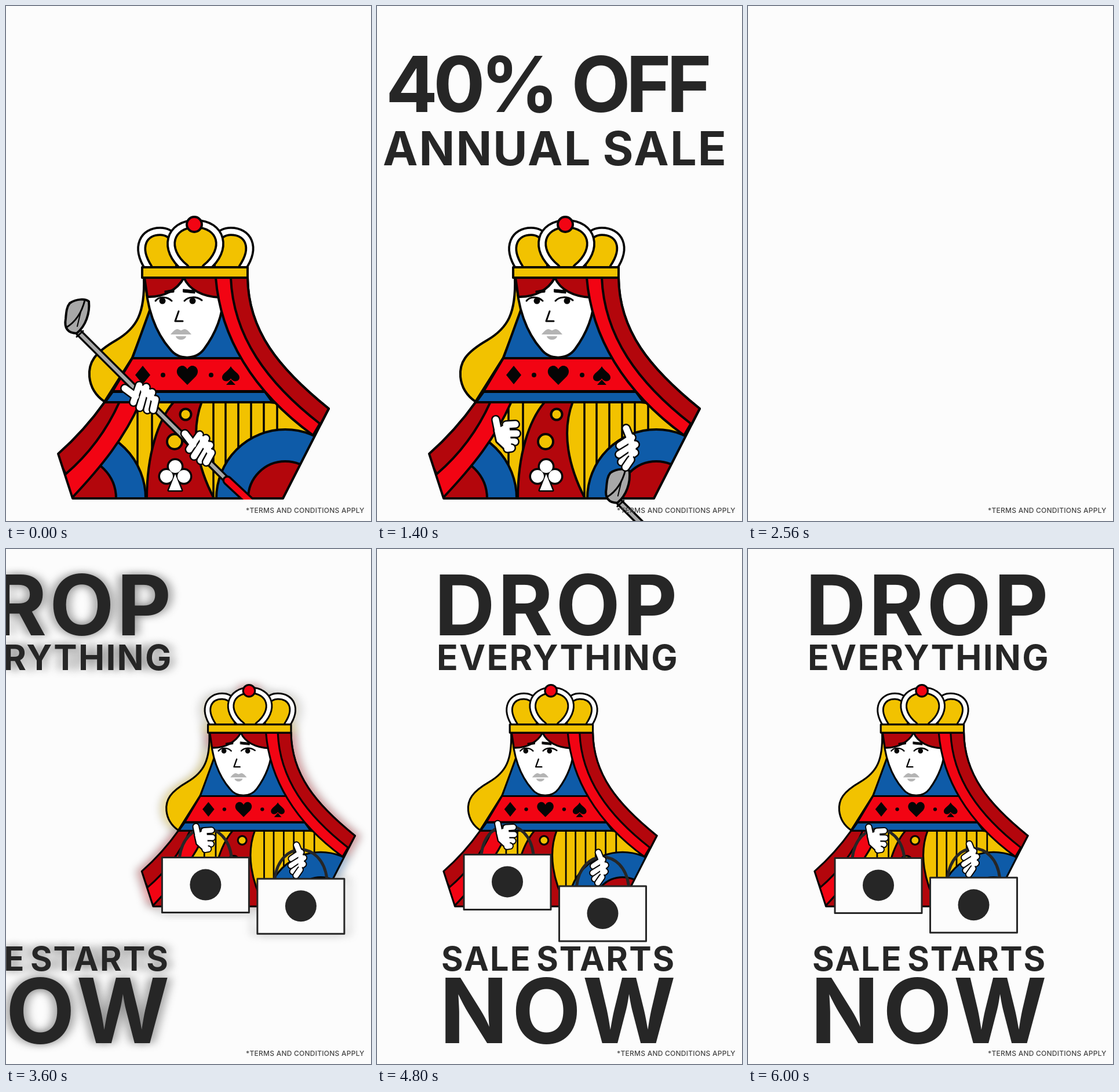
Animation of 630x889 px, one loop 6.04 s. Source, as an HTML page with a canvas:

```html
<!DOCTYPE html>
<html lang="en">
<head>
<meta charset="utf-8">
<title>Annual sale</title>
<style>
  html, body { margin: 0; width: 100%; height: 100%; overflow: hidden; background: #fcfcfc; }
  canvas { display: block; width: 630px; height: 889px; }
</style>
</head>
<body>
<canvas id="stage" width="630" height="889"></canvas>
<script>
const W = 630, H = 889, LOOP = 6040, STEP = 40;
const INK = '#050505', TEXT = '#262626', PAPER = '#fcfcfc', RED = '#f20413', DARK = '#b3060c',
  GOLD = '#f2c200', BLUE = '#0e5ba8', GREY = '#a8a8a8';
const stage = document.getElementById('stage').getContext('2d');
const buffer = document.createElement('canvas');
buffer.width = W;
buffer.height = H;
const layer = buffer.getContext('2d');
let c = stage;

const clamp = v => Math.max(0, Math.min(1, v));
const mix = (a, b, k) => a + (b - a) * k;

function shape(d, fill, line = 4, color = INK) {
  const p = new Path2D(d);
  if (fill) { c.fillStyle = fill; c.fill(p); }
  if (line) { c.lineWidth = line; c.strokeStyle = color; c.stroke(p); }
}

function disc(x, y, r, fill, line = 4) {
  c.beginPath();
  c.arc(x, y, r, 0, Math.PI * 2);
  c.fillStyle = fill;
  c.fill();
  if (line) { c.lineWidth = line; c.strokeStyle = INK; c.stroke(); }
}

function tube(d, outer, inner, color) {
  shape(d, null, outer);
  shape(d, null, inner, color);
}

// x is the left edge of the ink; track and gap are in em.
function words(text, x, y, size, track = 0, gap = 0, weight = 700, color = TEXT) {
  c.font = `${weight} ${size}px Inter, "Open Sans", sans-serif`;
  c.letterSpacing = track * size + 'px';
  c.wordSpacing = gap * size + 'px';
  c.textAlign = 'left';
  c.fillStyle = color;
  c.fillText(text, x + c.measureText(text).actualBoundingBoxLeft, y);
}

function at(x, y, turn, scale, draw) {
  c.save();
  c.translate(x, y);
  c.rotate(turn);
  c.scale(scale, scale);
  draw();
  c.restore();
}

// ---- hands ----
const GRIP = {
  thumb: 'M-27 -17 L-8 -3',
  palm: 'M-2 -22 L10 -19 L20 -10 L26 2 L20 4 L4 -8 Z',
  fingers: ['M-2 -22 L-12 7', 'M10 -19 L-1 16', 'M20 -10 L12 20', 'M26 2 L22 20']
};
const LEFT = {
  thumb: 'M-16 -24 L-11 0',
  palm: 'M-17 -5 L6 -17 L10 24 L3 28 L-13 13 Z',
  fingers: ['M2 -15 L18 -16', 'M0 0 L20 0', 'M0 14 L17 14', 'M4 26 L11 25']
};
const RIGHT = {
  thumb: 'M-2 -36 L6 -16',
  palm: 'M8 -20 L14 -8 L13 6 L6 18 L3 8 L3 -10 Z',
  fingers: ['M8 -20 L-13 -6', 'M14 -8 L-14 9', 'M13 6 L-10 22', 'M6 18 L-3 31']
};

function hand(h) {
  shape(h.thumb, null, 16);
  shape(h.palm, INK, 8);
  for (const f of h.fingers) tube(f, 16, 11, '#fff');
  shape(h.palm, '#fff', 2, '#fff');
  shape(h.thumb, null, 11, '#fff');
}

// ---- queen ----
function robe() {
  const edge = 'M170 684 C146 718 116 750 90 773 L115 850 H478 L557 695 L455 684 Z';
  c.save();
  c.clip(new Path2D(edge));
  shape(edge, GOLD, 0);
  for (const x of [227, 252, 358, 379, 401, 423, 445, 468]) shape(`M${x} 683 V850`, null, 3.5);
  shape('M290 683 C262 715 243 775 243 852 H360 C330 795 318 735 338 683 Z', DARK);
  disc(118, 850, 123, BLUE);
  disc(118, 850, 72, DARK);
  disc(482, 850, 119, BLUE);
  disc(482, 850, 64, DARK);
  shape('M232 683 C205 745 165 795 113 850 L85 773 L170 683 Z', RED);
  shape('M196 683 C175 730 145 772 103 808 L85 773 L170 680 Z', DARK);
  c.restore();
  shape(edge, null);
  disc(310, 705, 9.5, GOLD);
  disc(291, 752, 13, GOLD);
  const leaves = [[292, 795], [277, 812], [307, 812]];
  const stem = 'M292 808 L281 836 H303 Z';
  for (const [x, y] of leaves) disc(x, y, 12, '#fff', 5);
  shape(stem, '#fff', 5);
  for (const [x, y] of leaves) disc(x, y, 11, '#fff', 0);
  shape(stem, '#fff', 0);
}

function collar() {
  shape('M250 520 L218 608 H410 L372 515 Z', BLUE);
  shape('M218 608 H411 L447 665 H184 Z', RED);
  shape('M184 666 H447 L460 684 H171 Z', BLUE);
  shape('M236 621 L249 637 L236 653 L223 637 Z', INK, 0);
  disc(271, 637, 4, INK, 0);
  disc(354, 637, 4, INK, 0);
  shape('M313 654 L298 639 C288 626 305 613 313 627 C321 613 338 626 328 639 Z', INK, 0);
  shape('M388 622 C384 630 373 634 373 641 C373 649 384 650 388 643 C392 650 403 649 403 641 C403 634 392 630 388 622 Z', INK, 0);
  shape('M388 645 L396 654 H380 Z', INK, 0);
}

function face(look) {
  shape('M241 469 C241 520 259 565 283 592 C298 612 328 611 342 592 C362 565 375 532 374 505 L364 469 Z', '#fff');
  shape('M239 469 H307 C296 490 272 503 244 502 Z', DARK);
  shape('M307 469 H363 L369 503 C340 502 316 490 307 469 Z', DARK);
  shape('M274 492 L290 489 V494 L275 496 Z', INK, 1);
  shape('M306 489 L326 491 V496 L306 494 Z', INK, 1);
  shape('M258 509 C264 501 278 501 286 509', null, 3);
  shape('M308 509 C315 501 329 501 338 508', null, 3);
  disc(270 + look * 6, 509, 5.5, INK, 0);
  disc(322 + look * 6, 509, 5.5, INK, 0);
  shape('M298 527 L292 544 H305', null, 3);
  shape('M284 567 C289 561 293 557 297 558 L302 560 L307 558 C311 557 315 561 320 567 Z', '#b4b4b4', 0);
  shape('M293 570 H311 C309 578 295 578 293 570 Z', '#b4b4b4', 0);
}

function veil() {
  shape('M362 469 C370 570 425 665 530 741 L557 695 C470 625 418 560 417 469 Z', RED);
  shape('M388 469 C392 570 450 650 543 722 L557 695 C470 625 418 560 417 469 Z', DARK);
}

function crown() {
  const arches = ['M246 452 C222 415 238 389 266 389 C284 389 300 402 300 450',
    'M408 452 C433 415 417 389 388 389 C370 389 354 402 354 450'];
  for (const a of arches) { shape(a, GOLD, 0); tube(a, 16, 8.5, '#fff'); }
  const mid = 'M309 452 C269 420 282 376 327 376 C372 376 385 420 345 452';
  shape(mid, GOLD, 0);
  tube(mid, 16, 8.5, '#fff');
  shape('M235 451 H417 V469 H235 Z', GOLD);
  disc(325, 377, 13, RED);
}

function queen(look) {
  shape('M238 469 C240 530 226 556 190 577 C152 599 142 616 144 640 C146 660 157 674 170 683 L218 607 L252 520 Z', GOLD);
  robe();
  collar();
  face(look);
  veil();
  crown();
}

function golfClub(shift) {
  c.save();
  c.translate(shift, shift);
  c.beginPath();
  c.rect(0, 400, 600, 452);
  c.clip();
  tube('M126 564 L382 819', 13, 6, GREY);
  tube('M382 819 L425 859', 17, 10, RED);
  shape('M110 513 C122 505 137 505 143 510 C145 530 138 552 122 565 C107 565 100 556 103 540 C104 527 105 519 110 513 Z', GREY);
  shape('M136 508 C131 528 122 544 104 555', null, 3);
  shape('M129 528 L123 553', null, 2);
  shape('M122 571 L133 561', null, 3);
  c.restore();
}

// ---- scenes ----
function firstQueen(t) {
  const free = t >= 960, k = clamp((t - 960) / 200);
  queen(free ? 1 : 0);
  if (t < 1640) golfClub(Math.max(0, t - 920) * 0.61);
  if (free) {
    at(mix(234, 221, k), mix(677, 738, k), mix(-0.7, 0, k), 1, () => hand(LEFT));
    at(mix(330, 432, k), mix(762, 765, k), mix(-0.7, 0, k), 1, () => hand(RIGHT));
  } else {
    at(232, 677, 0, 1, () => hand(GRIP));
    at(330, 762, 0.28, 1, () => hand(GRIP));
  }
}

function saleTitle(y) {
  words('40% OFF', 21, 183 + y, 133, -0.06, 0.045);
  words('ANNUAL SALE', 11, 275 + y, 81, 0.026, -0.03);
}

function bag(x, y, h, dx, dy) {
  shape(`M${x - 45} ${y} C${x - 37} ${y - 67} ${x + 37} ${y - 67} ${x + 45} ${y}`, null, 5, TEXT);
  at(x + dx, y + dy, 0, 0.788, () => hand(h));
  shape(`M${x - 75} ${y} h150 v95 h-150 Z`, PAPER, 3, TEXT);
  disc(x, y + 47, 27, TEXT, 0);
}

function secondQueen(t) {
  c.save();
  c.translate(44, -52);
  c.scale(0.788, 0.787);
  queen(0);
  c.restore();
  const turn = (t - 4810) / 1350;
  const bob = 2 * Math.abs(turn - Math.round(turn));
  bag(225, 527 + 27 * bob, LEFT, -4, -34.5);
  bag(389.5, 583 - 66 * bob, RIGHT, -6, -30);
}

function dropTitle() {
  words('DROP', 108, 149, 145, 0.032);
  words('EVERYTHING', 106, 209, 60.5, 0.037);
  words('SALE STARTS', 113, 728, 57.5, 0.038, -0.13);
  words('NOW', 118, 853, 155, 0.042);
}

// Sharp picture over a soft sideways smear while it travels.
function slide(dx, draw) {
  if (Math.abs(dx) < 0.5) return draw();
  layer.clearRect(0, 0, W, H);
  c = layer;
  c.save();
  c.translate(dx, 0);
  draw();
  c.restore();
  c = stage;
  c.save();
  c.filter = 'blur(7px)';
  c.globalAlpha = 0.35;
  c.drawImage(buffer, -9, 0);
  c.drawImage(buffer, 9, 0);
  c.restore();
  c.drawImage(buffer, 0, 0);
}

function render(t) {
  c = stage;
  c.fillStyle = PAPER;
  c.fillRect(0, 0, W, H);
  if (t < 2560) {
    const out = clamp((t - 2140) / 420);
    slide(560 * out, () => firstQueen(t));
    if (t >= 40) slide(-620 * out, () => saleTitle(Math.min(0, (t - 680) * 0.455)));
  } else if (t >= 3200) {
    const left = 1 - clamp((t - 3200) / 640);
    slide(520 * Math.pow(left, 1.5), () => secondQueen(t));
    slide(-622 * left, dropTitle);
  }
  words('*TERMS AND CONDITIONS APPLY', 414, 875, 12, 0.02, 0, 500, '#444');
}

for (const g of [stage, layer]) {
  g.lineJoin = 'round';
  g.lineCap = 'round';
}
const start = performance.now();
function tick() {
  const t = (performance.now() - start) % LOOP;
  render(Math.floor(t / STEP) * STEP);
  requestAnimationFrame(tick);
}
tick();
</script>
</body>
</html>
```
